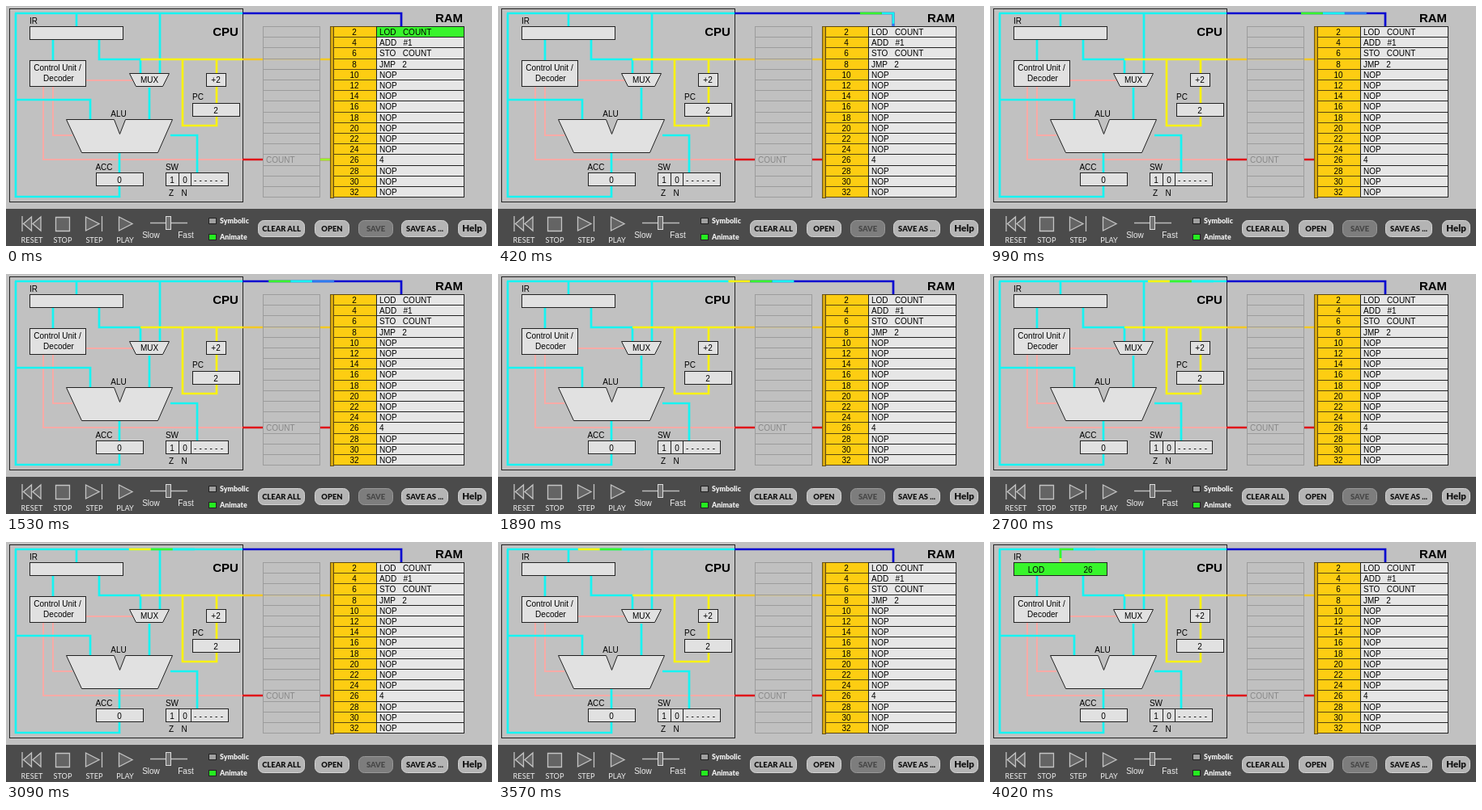
An HTML page that plays this animation: 600x297 px, repeating every 4.05 s.

```html
<!DOCTYPE html>
<html lang="en">
<head>
<meta charset="utf-8">
<title>CPU simulator</title>
<style>
html, body { margin: 0; width: 100%; height: 100%; overflow: hidden; background: #c1c1c1; }
svg { display: block; width: 600px; height: 297px; }
text { font: 10px "Liberation Sans", Arial, sans-serif; white-space: pre; }
.ui { font-family: Lato, sans-serif; }
</style>
</head>
<body>
<svg id="stage" viewBox="0 0 600 297"></svg>
<script>
const stage = document.getElementById('stage');
const LOOP = 4050, SPEED = 0.1105, START = 10.6, SEGMENT = 27;
const PATH_END = 433, CPU_EDGE = 196;
const CYAN = '#16f4f2', YELLOW = '#f8f212', GREEN = '#38f52c', AZURE = '#2c7cf0',
  RED = '#e00f18', BLUE = '#0808d0', PINK = '#f8aaa6', GOLD = '#fdcd12',
  EDGE = '#222', PALE = '#e1e1e1', CELL = '#e6e6e6';

function add(tag, attrs, content) {
  const el = document.createElementNS('http://www.w3.org/2000/svg', tag);
  for (const key in attrs) el.setAttribute(key, attrs[key]);
  if (content !== undefined) el.textContent = content;
  stage.append(el);
  return el;
}
const box = (x, y, width, height, fill = PALE, stroke = EDGE, rx = 0) =>
  add('rect', { x, y, width, height, fill, stroke, rx });
const wire = (d, stroke, width = 2.7) =>
  add('path', { d, stroke, fill: 'none', 'stroke-width': width });
const shape = (d, fill, stroke = 'none') => add('path', { d, fill, stroke });
const label = (x, y, s, anchor = 'start', style = '') =>
  add('text', { x, y, 'text-anchor': anchor, style }, s);
const uiLabel = (x, y, s, style, anchor = 'middle') =>
  label(x, y, s, anchor, style).setAttribute('class', 'ui');

// CPU wiring
box(4.5, 3.5, 288, 239, '#c1c1c1');
wire('M46 100V190H292M58 100V160H82M98 92H158', PINK, 2);
wire('M12 9V236H140V181M12 116H104V141M87 9V25M58 42V67M190 9V83M115 42V66H166V83M177 101V141M203 160H236V206', CYAN);
wire('M11 9H292', CYAN);
wire('M166 66H292M218 66V148H260V66', YELLOW);
wire('M292 66H400', '#f2c824');
wire('M292 190H317M387 190H400', RED);
wire('M292 9H488V25', BLUE);

// Moving pulse: coloured segments behind a common head
const route = 'M488 25V9H87V25';
const segments = [0, 1, 2].map(() => wire(route, GREEN));
const ramColors = [GREEN, CYAN, AZURE], cpuColors = [YELLOW, GREEN, CYAN];
const addressPulse = wire('', '#98f52c');

// CPU parts
const irBox = box(29.5, 25.5, 115, 16);
const irText = [label(57, 38, 'LOD', 'middle'), label(121, 38, '26', 'middle')];
box(29.5, 67.5, 69, 32);
shape('M152.5 83.5H201.5L193.5 99.5H160.5Z', PALE, EDGE);
shape('M74.5 140.5H133.5L140.5 158.5L147.5 140.5H205.5L187.5 181.5H93.5Z', PALE, EDGE);
box(247.5, 83.5, 24, 16);
box(230.5, 120.5, 58, 16);
box(111.5, 206.5, 58, 16);
box(197.5, 206.5, 77, 16);
wire('M213.5 206V223M228.5 206V223', EDGE, 1);
[[34, 22, 'IR'], [63.5, 79.5, 'Control Unit /'], [65, 92.5, 'Decoder'], [177, 95, 'MUX'],
  [259, 95, '+2'], [237, 116, 'PC'], [259, 133, '2'], [139, 137, 'ALU'],
  [121, 203, 'ACC'], [140, 219, '0'], [205, 203, 'SW'], [205, 219, '1'],
  [221, 219, '0'], [204, 235, 'Z'], [220, 235, 'N']]
  .forEach(([x, y, s]) => label(x, y, s, 'middle'));
label(232, 219, '------', 'start', 'letter-spacing:3.2px');
label(271, 36.5, 'CPU', 'middle', 'font-size:15px;font-weight:bold');
label(547, 19.5, 'RAM', 'middle', 'font-size:15px;font-weight:bold');

// Bus and memory
box(400.5, 25.5, 4, 212, '#d8a90e', '#6a5518');
const program = ['LOD   COUNT', 'ADD   #1', 'STO   COUNT', 'JMP   2'];
const rowY = i => Math.round(25 + i * 13.2) + .5;
let firstCell;
for (let i = 0; i < 16; i++) {
  const y = rowY(i), h = rowY(i + 1) - y;
  box(317.5, y, 70, h, '#c1c1c1', '#9c9c9c').setAttribute('fill-opacity', .75);
  box(404.5, y, 53, h, GOLD, '#5a4612');
  const cell = box(457.5, y, 108, h, CELL, EDGE);
  firstCell = firstCell || cell;
  label(430, y + 10.2, 2 * i + 2, 'middle');
  label(461, y + 10.2, i === 12 ? '4' : program[i] || 'NOP');
}
label(321, 194, 'COUNT').setAttribute('fill', '#888');

// Control bar
box(0, 251, 600, 46, '#4b4b4b', 'none');
const icon = d => add('path', { d, fill: '#646464', stroke: '#c4c4c4', 'stroke-width': 1.3 });
icon('M20 260V279M31.5 261V278L21.5 269.5ZM43 261V278L33 269.5Z');
icon('M61.5 261.5H78.5V278.5H61.5Z');
icon('M98.5 261V278L115 269.5ZM118.5 260V279');
icon('M139.5 261V278L156 269.5Z');
[[32, 'RESET'], [70, 'STOP'], [109, 'STEP'], [147, 'PLAY']]
  .forEach(([x, s]) => uiLabel(x, 293, s, 'fill:#eee;font-size:9.2px'));
wire('M178 268.5H224', '#bbb', 1.5);
box(197.5, 260.5, 6, 16, '#727272', '#ddd');
label(179, 287, 'Slow', 'middle', 'fill:#eee');
label(222, 287, 'Fast', 'middle', 'fill:#eee');
[[262, '#a0a0a0', 'Symbolic'], [282, '#25ed20', 'Animate']].forEach(([y, fill, s]) => {
  box(250.5, y + .5, 9, 7, fill, EDGE);
  uiLabel(264, y + 6.5, s, 'fill:#eee;font-size:8.8px;font-weight:900', 'start');
});
[[311, 58, 'CLEAR ALL'], [381, 43, 'OPEN'], [435, 43, 'SAVE'],
  [488, 58, 'SAVE AS ...'], [558, 35, 'Help']].forEach(([x, w, s]) => {
  const off = s === 'SAVE';
  box(x + .5, 265.5, w - 1, 20, off ? '#7d7d7d' : '#b4b4b4', off ? '#999' : '#d6d6d6', 7);
  const size = s === 'Help' ? 11.5 : 9.4;
  uiLabel(x + w / 2, 279, s, `fill:${off ? '#484848' : '#111'};font-size:${size}px;font-weight:900`);
});

function draw(time) {
  const t = time % LOOP;
  const head = t < 90 ? 0 : START + SPEED * t;
  const colors = head < CPU_EDGE ? ramColors : cpuColors;
  segments.forEach((el, i) => {
    const a = Math.max(0, head - (i + 1) * SEGMENT);
    const b = Math.min(PATH_END, head - i * SEGMENT);
    el.setAttribute('visibility', b > a ? 'visible' : 'hidden');
    if (b > a) el.setAttribute('stroke-dasharray', `0 ${a} ${b - a} 999`);
    el.setAttribute('stroke', colors[i]);
  });
  const x = 387 + SPEED * t;
  addressPulse.setAttribute('d', x < 400 ? `M${x} 190H400` : '');
  firstCell.setAttribute('fill', t < 260 ? GREEN : CELL);
  const loaded = head >= PATH_END;
  irBox.setAttribute('fill', loaded ? GREEN : PALE);
  irText.forEach(el => el.setAttribute('visibility', loaded ? 'visible' : 'hidden'));
}

const start = performance.now();
function animate() {
  draw(performance.now() - start);
  requestAnimationFrame(animate);
}
animate();
</script>
</body>
</html>
```
